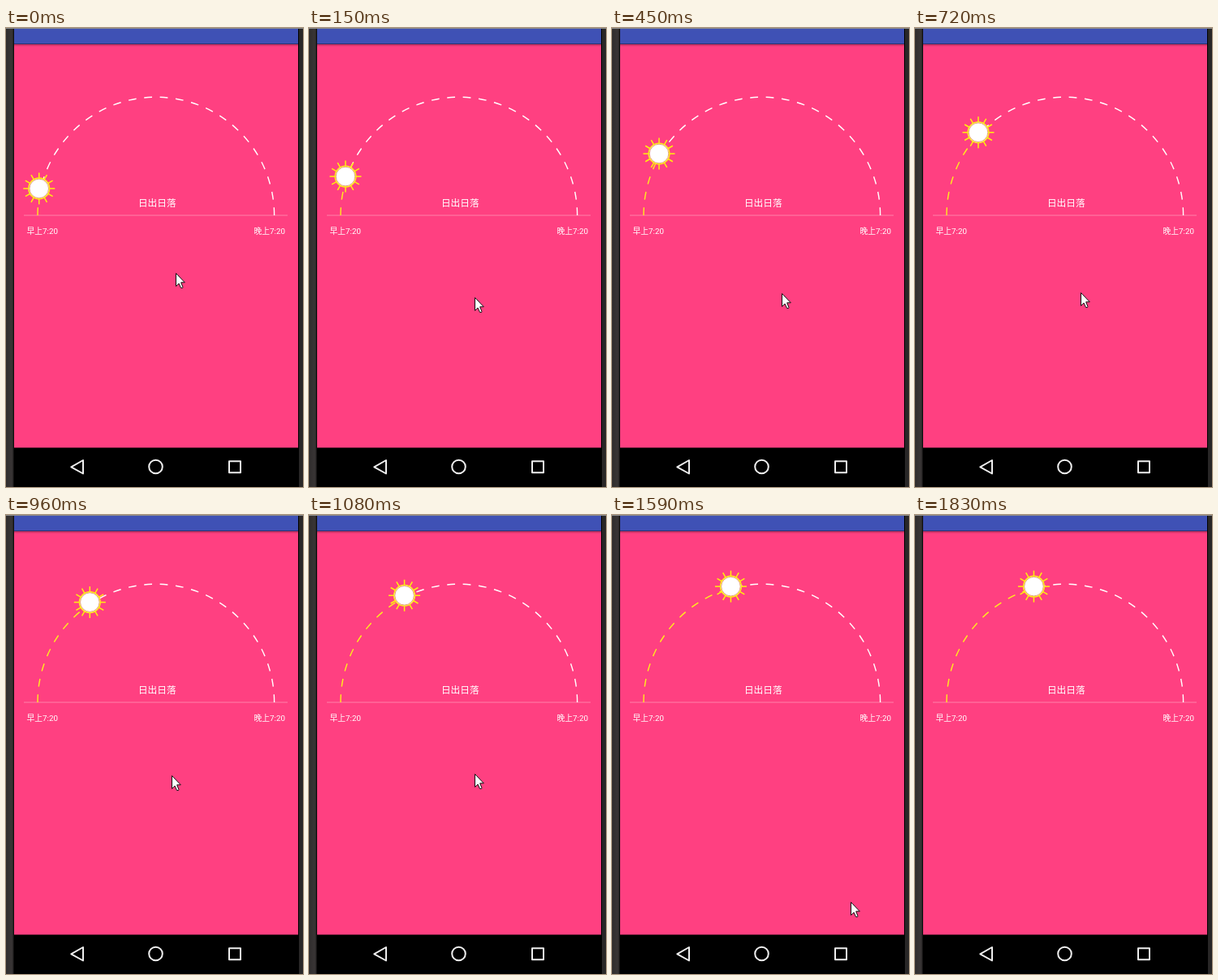
These frames come from a looping animation (366x566 px, 2.14 s). An HTML page:

```html
<!DOCTYPE html>
<html lang="zh-CN">
<head>
<meta charset="utf-8">
<title>日出日落</title>
<style>
  html, body { margin: 0; height: 100%; overflow: hidden; background: #000; }
  svg { display: block; width: 100vw; height: 100vh; }
  text { fill: #fff; font-family: Roboto, "Noto Sans CJK SC", "Noto Sans CJK", sans-serif; }
</style>
</head>
<body>
<svg viewBox="0 0 366 566">
  <defs>
    <linearGradient id="edge">
      <stop offset="0" stop-color="#302d2d"/>
      <stop offset=".7" stop-color="#393535"/>
      <stop offset="1" stop-color="#1c1a1a"/>
    </linearGradient>
    <linearGradient id="shade" x2="0" y2="1">
      <stop offset="0" stop-opacity=".4"/>
      <stop offset="1" stop-opacity="0"/>
    </linearGradient>
    <clipPath id="passed"><rect id="past" y="60" height="180"/></clipPath>
    <clipPath id="ahead"><rect id="rest" y="60" width="366" height="180"/></clipPath>
    <path id="arc" d="M39 231A145.8 145.8 0 0 1 330.6 231" fill="none" stroke-width="1.4"
      pathLength="47" stroke-dasharray="1"/>
  </defs>

  <rect width="366" height="566" fill="#292727"/>
  <rect width="10" height="566" fill="url(#edge)"/>
  <rect x="9.5" width="351.5" height="566"/>
  <rect x="10" width="350" height="517.5" fill="#ff4081"/>
  <rect x="10" width="350" height="20" fill="#3f51b5"/>
  <rect x="10" y="19" width="350" height="4" fill="url(#shade)"/>
  <rect width="366" height="1" fill="#8c8c8c"/>

  <g fill="none" stroke="#eee" stroke-width="2" stroke-linejoin="round">
    <path d="M80.3 541.3L95 533V549.5Z"/>
    <circle cx="184.5" cy="541" r="8.3"/>
    <rect x="275" y="534.2" width="14" height="14"/>
  </g>

  <rect x="22" y="230.5" width="325" height="1" fill="#ff80aa"/>
  <text x="186.3" y="220" font-size="11.7" text-anchor="middle">日出日落</text>
  <text x="25.5" y="254.3" font-size="9.8">早上7:20</text>
  <text x="305.5" y="254.3" font-size="9.8">晚上7:20</text>

  <g clip-path="url(#ahead)"><use href="#arc" stroke="#fff"/></g>
  <g clip-path="url(#passed)"><use href="#arc" stroke="#ffee1c"/></g>

  <g id="sun">
    <g id="rays" stroke="#fff00c" stroke-width="1.5"></g>
    <circle r="12.9" fill="#fff" stroke="#ffec14" stroke-width="1.4"/>
    <circle r="11.8" fill="#fff" stroke="#e08a50" stroke-width=".8"/>
  </g>
  <path id="cursor" d="M.5 .5V16.5L4.1 13.1L6.5 18.5H8.6L8.9 17.4L6.7 11.8H11.3Z"
    fill="#fff" stroke="#111" stroke-linejoin="round"/>
</svg>
<script>
const $ = id => document.getElementById(id);
const LOOP = 2140, LAST_STEP = 14;

// key points: step, then values
const sunKeys = [[0, 12.9], [3, 30.9], [8, 62.9], [10, 74.9]];
const cursorKeys = [
  [0, 209, 302], [1, 204, 332], [2, 205, 326], [3, 209, 327],
  [5, 204, 326], [8, 204, 319], [10, 219, 333], [13, 332, 549]
];

for (let a = 0; a < 360; a += 30)
  $('rays').innerHTML += `<path d="M13 0H19.5" transform="rotate(${a})"/>`;

const move = (id, x, y) => $(id).setAttribute('transform', `translate(${x} ${y})`);

// The picture advances in uneven steps.
function stepAt(t) {
  let step = 0;
  while (step < LAST_STEP && (t -= step < 4 || step === 8 ? 150 : 120) >= 0) step++;
  return step;
}

function between(keys, step) {
  const i = keys.findIndex(k => k[0] >= step);
  if (i < 1) return keys.at(i).slice(1);
  const a = keys[i - 1], b = keys[i], p = (step - a[0]) / (b[0] - a[0]);
  return a.map((v, n) => v + (b[n] - v) * p).slice(1);
}

function draw() {
  const step = stepAt(performance.now() % LOOP);
  const a = between(sunKeys, step)[0] * Math.PI / 180;
  const x = 185 - 148 * Math.cos(a), y = 231 - 148 * Math.sin(a);
  move('sun', x, y);
  move('cursor', ...between(cursorKeys, step).map(Math.round));
  $('cursor').style.display = step < LAST_STEP ? '' : 'none';
  $('past').setAttribute('width', x);
  $('rest').setAttribute('x', x);
  requestAnimationFrame(draw);
}
draw();
</script>
</body>
</html>
```
